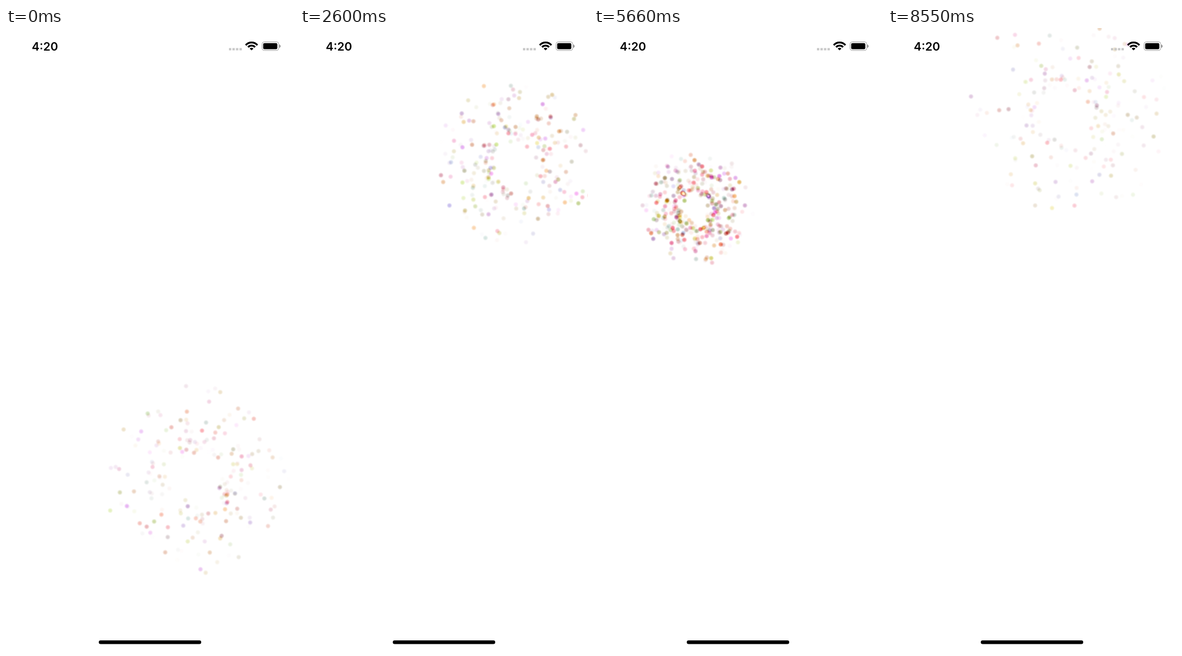
An HTML page with a canvas for the animation above (8600 ms loop, 509x1100 px).

```html
<!DOCTYPE html>
<html lang="en">
<head>
<meta charset="utf-8">
<title>Fireworks</title>
<style>
  html, body { margin: 0; width: 100%; height: 100%; overflow: hidden; background: #fff; }
  canvas, svg { position: absolute; left: 0; top: 0; width: 509px; height: 1100px; }
  text { font: 600 20.5px Inter, "Liberation Sans", sans-serif; }
</style>
</head>
<body>
<canvas id="sky" width="509" height="1100"></canvas>
<svg viewBox="0 0 509 1100">
  <text x="45.5" y="40">4:20</text>
  <path d="M394 37.6H417" stroke="#c8c8c8" stroke-width="4" stroke-dasharray="4.2 2"/>
  <g fill="none" stroke="#000" stroke-width="3.3">
    <path d="M423.7 30.3A13.8 13.8 0 0 1 444.3 30.3"/>
    <path d="M427.8 33.9A8.4 8.4 0 0 1 440.2 33.9"/>
  </g>
  <path d="M434 39.6L430.7 36.4A4.6 4.6 0 0 1 437.3 36.4Z"/>
  <rect x="452.5" y="24.5" width="29.6" height="15.2" rx="4" fill="none" stroke="#a0a0a0"/>
  <rect x="454.5" y="26.8" width="25" height="10.8" rx="2.3"/>
  <path d="M483.4 29.6A3 3 0 0 1 483.4 34.8Z" fill="#888" stroke="#888" stroke-width=".8"/>
  <rect x="164" y="1083" width="181" height="6.4" rx="3.2"/>
</svg>
<script>
const LOOP = 8600, FIRST = -462, EVERY = 532, LIFE = 715;
const COUNT = 400, TINTS = 90, FADE = 1 / LIFE;
const ctx = document.getElementById('sky').getContext('2d');

// Where each burst goes off, one every EVERY ms
const centres = [
  [338, 795], [230, 250], [330, 950], [150, 400], [421, 1079], [380, 240],
  [300, 932], [229, 370], [190, 860], [285, 350], [270, 230], [180, 320],
  [385, 400], [275, 601], [390, 300], [62, 605], [315, 155]
];

let seed = 71;
function rand(lo = 0, hi = 1) {
  seed = (seed + 0x6D2B79F5) | 0;
  let n = Math.imul(seed ^ (seed >>> 15), seed | 1);
  n ^= n + Math.imul(n ^ (n >>> 7), n | 61);
  return lo + (hi - lo) * ((n ^ (n >>> 14)) >>> 0) / 4294967296;
}

function makeDot() {
  const dot = document.createElement('canvas');
  dot.width = dot.height = 10;
  const c = dot.getContext('2d');
  const rgb = [rand(0.4, 1), rand(0, 0.82), rand() ** 1.9].map(v => Math.round(v * 255));
  const glow = c.createRadialGradient(5, 5, 0, 5, 5, 4.8);
  const stop = (at, a) => glow.addColorStop(at, `rgba(${rgb},${a})`);
  stop(0, 1);
  stop(0.45, 0.9);
  stop(0.75, 0.45);
  stop(1, 0);
  c.fillStyle = glow;
  c.fillRect(0, 0, 10, 10);
  return dot;
}

const dots = Array.from({ length: TINTS }, makeDot);

function makeSpark([x, y]) {
  const angle = rand(0, 2 * Math.PI), speed = 0.105 + 0.25 * rand() ** 1.25;
  return {
    x: x + rand(-8, 8),
    y: y + rand(-8, 8),
    vx: Math.cos(angle) * speed,
    vy: Math.sin(angle) * speed,
    alpha: rand(0.3, 1),
    dot: dots[Math.floor(rand(0, TINTS))]
  };
}

const bursts = centres.map(c => Array.from({ length: COUNT }, () => makeSpark(c)));

function draw() {
  const t = performance.now() % LOOP;
  ctx.clearRect(0, 0, 509, 1100);
  // Summed colour and alpha: crowded sparks burn out to white
  ctx.globalCompositeOperation = 'lighter';
  bursts.forEach((sparks, i) => {
    const age = t - FIRST - i * EVERY;
    if (age < 0 || age > LIFE) return;
    for (const s of sparks) {
      const alpha = s.alpha - age * FADE;
      if (alpha <= 0) continue;
      ctx.globalAlpha = alpha;
      ctx.drawImage(s.dot, s.x + s.vx * age - 5, s.y + s.vy * age - 5);
    }
  });
  requestAnimationFrame(draw);
}
draw();
</script>
</body>
</html>
```
